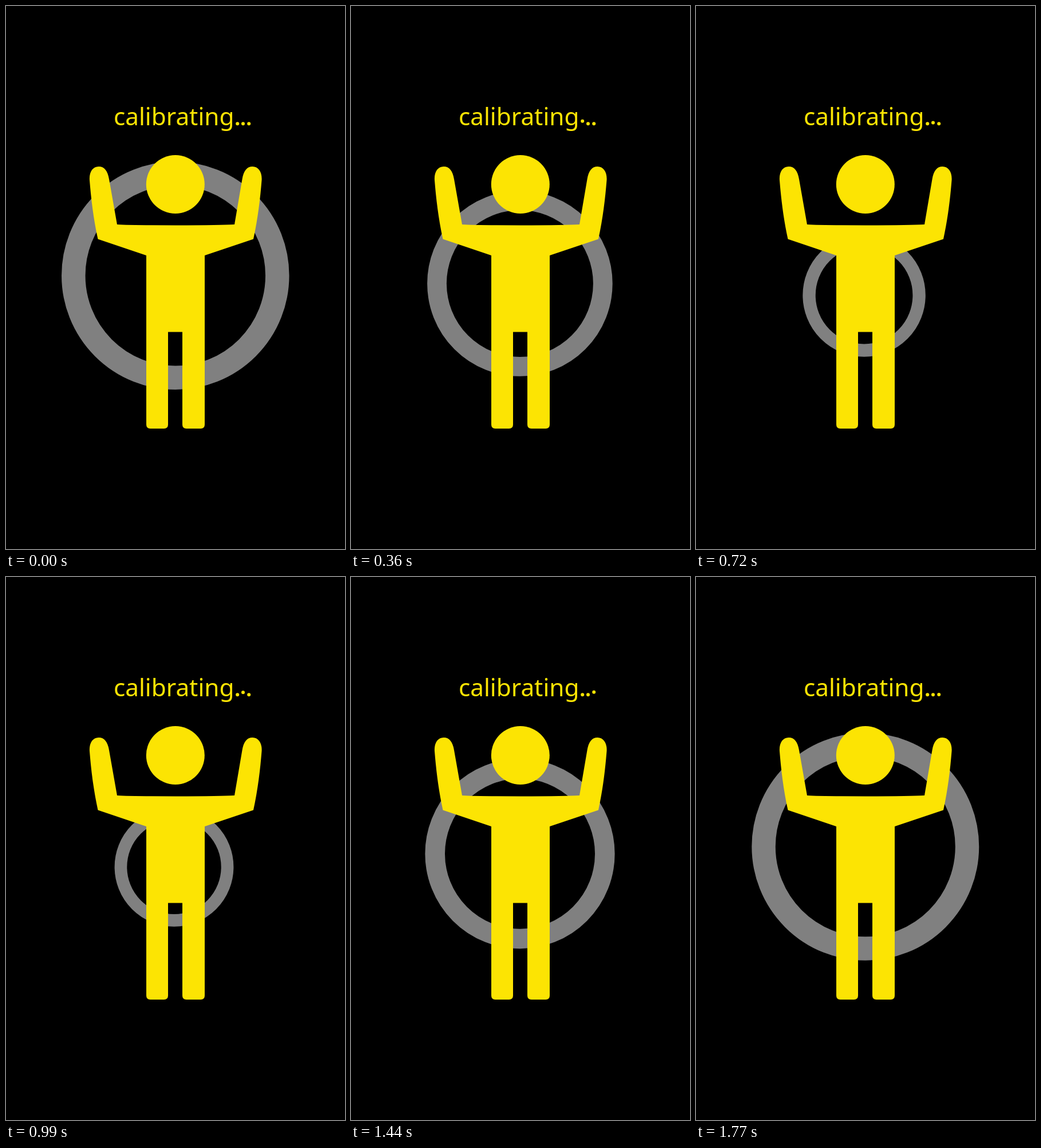
Recreate the animation shown at these times as an HTML page. Size 592 by 947 pixels, loop 1800 ms.

```html
<!DOCTYPE html>
<html lang="en">
<head>
<meta charset="utf-8">
<title>Calibrating</title>
<style>
  html, body { margin: 0; width: 100%; height: 100%; overflow: hidden; background: #000; }
  svg { display: block; width: 100vw; height: 100vh; }
  text { font: 42.3px "Noto Sans", "Open Sans", sans-serif; }
</style>
</head>
<body>
<svg viewBox="0 0 592 947" fill="#fce403">
  <circle id="ring" fill="none" stroke="#808080"/>
  <text x="187.9" y="208">calibrating</text>
  <g id="dots">
    <circle cx="404.2" r="3"/>
    <circle cx="414" r="3"/>
    <circle cx="424.2" r="3"/>
  </g>
  <circle cx="295.8" cy="311" r="51"/>
  <path d="M194 381 Q215 382.4 296 382.4 Q378 382.4 399 381
    L412.5 302 C415 287 421 280 430.5 280 C441 280 447.5 290 446.5 304
    C444 335 440 370 432 406.5 L347 435
    V730 q0 7 -7 7 H315 q-7 0 -7 -7 V568.5 H283 V730 q0 7 -7 7 H252 q-7 0 -7 -7 V435
    L160.5 406.5 C152.500 370 148.500 335 146 304 C145 290 151 280 162 280
    C171.500 280 177.500 287 180 302 Z"/>
</svg>
<script>
const LOOP = 1800, STEP = 30, SHRINK = 870, HOP = 600;
const ring = document.getElementById("ring");
const dots = [...document.getElementById("dots").children];

const ease = p => p * p * (3 - 2 * p);

function setAll(el, attrs) {
  for (const name in attrs) el.setAttribute(name, attrs[name]);
}

function draw(t) {
  const shrunk = t < SHRINK ? t / SHRINK : (LOOP - t) / (LOOP - SHRINK);
  const scale = 1 - 0.5 * ease(shrunk);
  // The ring scales about a point below its centre.
  setAll(ring, {
    cx: 291 + 4.8 * scale,
    cy: 544.8 - 74.6 * scale,
    r: 178 * scale,
    "stroke-width": 41.5 * scale
  });

  dots.forEach((dot, i) => {
    const p = (t - i * HOP) / HOP;
    const lift = p > 0 && p < 1 ? ease(1 - Math.abs(2 * p - 1)) : 0;
    dot.setAttribute("cy", 205.2 - 5 * lift);
  });
}

function tick() {
  draw(Math.floor(performance.now() % LOOP / STEP) * STEP);
  requestAnimationFrame(tick);
}
tick();
</script>
</body>
</html>
```
